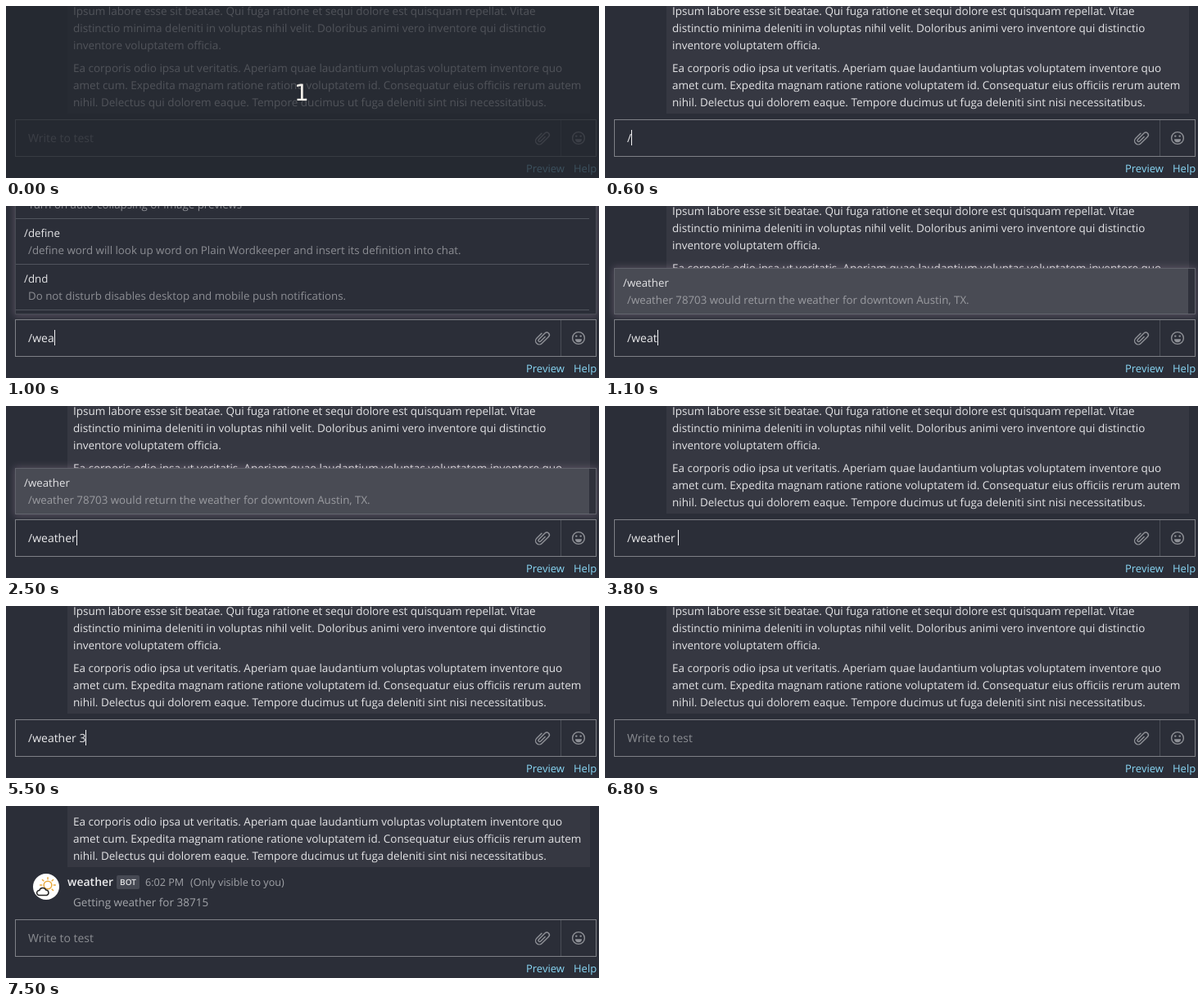
Animation, 724 px wide and 211 px high, one loop 8 s. Source, as an HTML page:

```html
<!DOCTYPE html>
<html lang="en">
<head>
<meta charset="utf-8">
<title>Slash command</title>
<style>
  html, body { margin: 0; width: 100%; height: 100%; overflow: hidden; background: #2b2e38; }
  svg { display: block; width: 724px; height: 211px; }
  text { font-family: "Open Sans", sans-serif; white-space: pre; text-rendering: geometricPrecision; }
  .post { font-size: 13.5px; fill: #e4e4e6; }
  .cmd { font-size: 13.3px; fill: #e4e4e6; }
  .desc { opacity: .52; }
  .input { font-size: 14px; fill: #e8e8ea; }
  .hint { font-size: 14px; fill: #8b8d92; }
  .meta { font-size: 12.6px; fill: #a0a2a7; }
  .link { font-size: 13px; fill: #89d7f5; }
  .icon { fill: none; stroke: #8f9197; stroke-width: 1.4; stroke-linecap: round; }
</style>
</head>
<body>
<svg id="stage" viewBox="0 0 724 211">
  <defs>
    <filter id="soft" x="-5%" y="-40%" width="110%" height="180%"><feGaussianBlur stdDeviation="4"/></filter>
  </defs>
  <rect width="724" height="211" fill="#2b2e38"/>

  <g id="posts"><rect x="75" y="-20" width="638" height="152" fill="#363842"/></g>

  <g id="reply">
    <circle cx="49" cy="99" r="16" fill="#fff"/>
    <g fill="none" stroke="#e9a93c" stroke-width="1.5" stroke-linecap="round">
      <circle cx="51" cy="97" r="4.8"/>
      <g id="rays"></g>
    </g>
    <path d="M40.5 109.5a3 3 0 0 1 .3-6a4.2 4.2 0 0 1 7.9-.6a3.4 3.4 0 0 1 1 6.6z" fill="#fff" stroke="#222" stroke-width="1.5"/>
    <text x="75" y="98" font-size="14" font-weight="600" fill="#ececee">weather</text>
    <rect x="135" y="85" width="28" height="17" rx="2" fill="#464953"/>
    <text x="149" y="97" font-size="10" font-weight="600" fill="#e4e4e6" text-anchor="middle">BOT</text>
    <text class="meta" x="170" y="98">6:02 PM</text>
    <text class="meta" x="225" y="98">(Only visible to you)</text>
    <text class="post" x="82" y="123" style="fill:#a3a5aa">Getting weather for 38715</text>
  </g>

  <g id="fullMenu">
    <rect x="10" y="-30" width="712" height="165" fill="#a48ca6" opacity=".34" filter="url(#soft)"/>
    <rect x="11.5" y="-30.5" width="709" height="163" fill="#2b2e38" stroke="#484b54"/>
  </g>
  <g id="shortMenu">
    <rect x="10" y="75" width="712" height="60" fill="#a48ca6" opacity=".34" filter="url(#soft)"/>
    <rect x="11.5" y="76.5" width="709" height="56" fill="#2f313b" stroke="#60626b"/>
    <rect x="12" y="77" width="700" height="56" fill="#494b54"/>
    <path d="M12 132.5H712" stroke="#62656d"/>
  </g>

  <rect x="11.5" y="139.5" width="709" height="45" fill="#2b2e38" stroke="#7f8187"/>
  <path d="M677.5 140V184" stroke="#4a4d56"/>
  <g class="icon">
    <path transform="translate(655 161.5) rotate(45)" d="M-4.5-3V5.5a4.5 4.5 0 0 0 9 0V-6a3.1 3.1 0 0 0-6.2 0V4.8a1.6 1.6 0 0 0 3.2 0V-3"/>
    <circle cx="699" cy="162" r="7.4"/>
    <path d="M695 163.3h8a4 4 0 0 1-8 0z" fill="#8f9197" stroke="none"/>
    <circle cx="696.3" cy="159.6" r="1.2" fill="#8f9197" stroke="none"/>
    <circle cx="701.7" cy="159.6" r="1.2" fill="#8f9197" stroke="none"/>
  </g>
  <text id="hint" class="hint" x="27" y="167">Write to test</text>
  <text id="typed" class="input" x="27" y="167"></text>
  <rect id="caret" width="1" height="19" fill="#f2f2f4"/>
  <text class="link" x="635" y="204">Preview</text>
  <text class="link" x="693" y="204">Help</text>

  <g id="countdown">
    <rect width="724" height="211" fill="#24272f" opacity=".77"/>
    <text x="361" y="116" text-anchor="middle" fill="#f1eee8" style="font:28px 'DejaVu Sans',sans-serif">1</text>
  </g>
</svg>
<script>
const LOOP = 8000;
const $ = id => document.getElementById(id);

function add(parent, tag, attrs, text = "") {
  const el = document.createElementNS("http://www.w3.org/2000/svg", tag);
  for (const k in attrs) el.setAttribute(k, attrs[k]);
  el.textContent = text;
  parent.appendChild(el);
}

// baseline, line of text
[
  [11, "Ipsum labore esse sit beatae. Qui fuga ratione et sequi dolore est quisquam repellat. Vitae"],
  [32, "distinctio minima deleniti in voluptas nihil velit. Doloribus animi vero inventore qui distinctio"],
  [53, "inventore voluptatem officia."],
  [81, "Ea corporis odio ipsa ut veritatis. Aperiam quae laudantium voluptas voluptatem inventore quo"],
  [102, "amet cum. Expedita magnam ratione ratione voluptatem id. Consequatur eius officiis rerum autem"],
  [123, "nihil. Delectus qui dolorem eaque. Tempore ducimus ut fuga deleniti sint nisi necessitatibus."]
].forEach(([y, line]) => add($("posts"), "text", { class: "post", x: 82, y }, line));

function addCommand(menu, top, name, desc) {
  add(menu, "text", { class: "cmd", x: 22, y: top + 22 }, name);
  add(menu, "text", { class: "cmd desc", x: 27, y: top + 43 }, desc);
}

[
  ["/collapse", "Turn on auto-collapsing of image previews"],
  ["/define", "/define word will look up word on Plain Wordkeeper and insert its definition into chat."],
  ["/dnd", "Do not disturb disables desktop and mobile push notifications."]
].forEach(([name, desc], i) => {
  const top = 56 * i - 40;
  addCommand($("fullMenu"), top, name, desc);
  add($("fullMenu"), "path", { d: `M12 ${top + 55.5}H712`, stroke: "#50545d" });
});
addCommand($("shortMenu"), 77, "/weather", "/weather 78703 would return the weather for downtown Austin, TX.");

for (let a = 0; a < 360; a += 45) {
  add($("rays"), "path", { d: "M51 89.7v-2", transform: `rotate(${a} 51 97)` });
}

// time, field content, start of the caret blink (default: time)
const keys = [
  [0, "", -500], [100, ""], [600, "/"], [900, "/we"], [1000, "/wea"], [1100, "/weat"],
  [1300, "/weath"], [1400, "/weathe"], [1500, "/weather"], [3600, "/weather "],
  [5500, "/weather 3"], [5600, "/weather 38"], [5800, "/weather 387"],
  [6000, "/weather 3871"], [6100, "/weather 38715"], [6800, "", 6100], [7000, ""]
];

const show = (id, on) => $(id).setAttribute("display", on ? "inline" : "none");

function draw(t) {
  const [at, value, blink = at] = keys.filter(k => k[0] <= t).pop();
  $("typed").textContent = value;
  show("hint", !value);
  const width = value ? $("typed").getComputedTextLength() : 0;
  $("caret").setAttribute("x", Math.round(27 + width));
  $("caret").setAttribute("y", value ? 152 : 153);
  show("caret", (t - blink) % 1000 < 500);

  show("countdown", t < 100);
  show("fullMenu", t >= 700 && t < 1100);
  show("shortMenu", t >= 1100 && t < 3800);
  const sent = t >= 7000;
  show("reply", sent);
  $("posts").setAttribute("transform", `translate(0 ${sent ? -57 : 0})`);
}

const start = performance.now();
function tick() {
  draw((performance.now() - start) % LOOP);
  requestAnimationFrame(tick);
}
tick();
</script>
</body>
</html>
```
